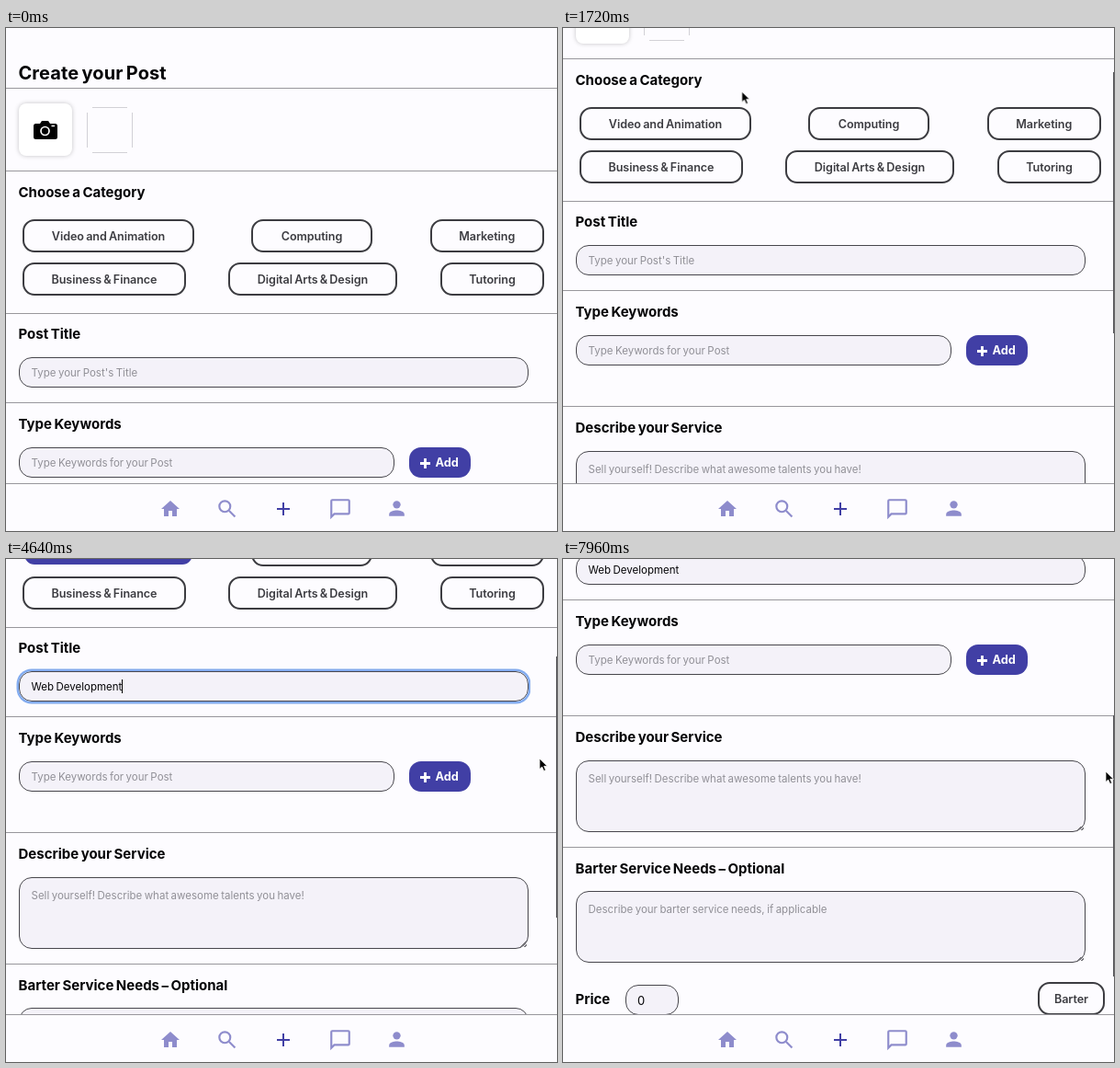
These frames come from a looping animation (600x547 px, 8 s). An HTML page:

```html
<!DOCTYPE html>
<html lang="en">
<head>
<meta charset="utf-8">
<title>Create your Post</title>
<style>
  * { box-sizing: border-box; }
  html, body { margin: 0; width: 100%; height: 100%; overflow: hidden; background: #fdfcff; }
  body { position: relative; font-family: Inter, "Open Sans", sans-serif; word-spacing: -.07em; color: #050507; }
  :root { --loop: 8s linear infinite; --ink: #3c3c41; --purple: #413fa5; }

  #view { position: absolute; left: 0; top: 0; width: 600px; height: 495px; overflow: hidden; }
  #page, #lower { position: absolute; left: 0; top: 0; width: 600px; height: 0; }
  #page > *, #lower > *, nav svg { position: absolute; }
  #page { animation: scroll var(--loop); }
  #lower { animation: push var(--loop); }

  h1, h2 { margin: 0; left: 13.5px; line-height: 20px; font-weight: 700; white-space: nowrap; word-spacing: -.07em; }
  h1 { font-size: 20px; letter-spacing: .07px; }
  h2 { font-size: 15px; letter-spacing: 0; }
  hr { margin: 0; border: 0; left: 0; width: 600px; height: 1px; background: #98979c; }

  .card { left: 14px; top: 82px; width: 58px; height: 57px; border-radius: 8px; background: #fff; box-shadow: 0 0 5px rgba(0, 0, 0, .23); }
  .pill { height: 36px; border: 2px solid var(--ink); border-radius: 13px; font-size: 12.6px; font-weight: 600;
    letter-spacing: -.07px; word-spacing: -.07em; line-height: 33px; text-align: center; color: var(--ink); white-space: nowrap; }
  .fill { position: absolute; inset: 0; border-radius: 11px; background: var(--purple); color: #fff; line-height: 33px; }
  #video { animation: unborder var(--loop); }
  #video .fill { opacity: 0; animation: pick var(--loop); }

  .field { left: 14px; height: 33px; padding-left: 12.5px; border: 1px solid #47464c; border-radius: 14px; background: #f4f2f9;
    font-size: 11.5px; letter-spacing: .01px; word-spacing: -.07em; line-height: 32px; white-space: nowrap; }
  .area { width: 554.5px; height: 78px; line-height: 38px; }
  .area::after { content: ""; position: absolute; right: 1px; bottom: 1px; width: 7px; height: 7px;
    background: linear-gradient(135deg, transparent 50%, #77767c 50% 60%, transparent 60% 76%, #77767c 76% 86%, transparent 86%); }
  .ph { color: #919097; }
  .ring { position: absolute; inset: -1px; border-radius: 14px; box-shadow: 0 0 0 2.5px #82abef; opacity: 0; }
  .caret { display: inline-block; width: 1px; height: 15px; margin-right: -1px; vertical-align: -3px; background: #000; opacity: 0; }
  #title .ring, #title .caret { animation: focus1 var(--loop); }
  #words .ring, #words .caret { animation: focus2 var(--loop); }

  .add { left: 438.5px; top: 456px; width: 67px; height: 33px; border-radius: 13px; background: var(--purple); color: #fff;
    font-size: 12.8px; font-weight: 700; letter-spacing: -.1px; line-height: 34px; padding-left: 29px; }
  .add svg { position: absolute; left: 12px; top: 12px; }
  .chip { left: 270px; top: 513px; width: 64px; height: 25px; border: 1px solid #4a494f; border-radius: 13px;
    padding-left: 8px; font-size: 12.6px; line-height: 23px; color: #45444a; opacity: 0; animation: chip var(--loop); }
  .chip svg { position: absolute; left: 44px; top: 7px; }

  #bar { position: absolute; left: 599px; top: 0; width: 1px; height: 284px; background: #56555a; animation: bar var(--loop), barfade var(--loop); }
  nav { position: absolute; left: 0; top: 495px; width: 600px; height: 52px; border-top: 1px solid #98979c; background: #fdfcff; fill: #8e8ccc; }
  #cursor { position: absolute; left: 0; top: 0; animation: move var(--loop), hide var(--loop); }
  #cursor svg { position: absolute; overflow: visible; }
  #arrow { left: -1px; top: -1px; animation: arrow var(--loop); }
  #beam { left: -4px; top: -7px; opacity: 0; animation: beam var(--loop); }

  /* cubic ease-out gives the flick of a trackpad scroll */
  @keyframes scroll {
    0%, 10.4% { transform: translateY(0); animation-timing-function: cubic-bezier(.215, .61, .355, 1); }
    20.5%, 25.7% { transform: translateY(-122px); animation-timing-function: cubic-bezier(.215, .61, .355, 1); }
    30.5%, 46.5% { transform: translateY(-160px); animation-timing-function: cubic-bezier(.215, .61, .355, 1); }
    58% { transform: translateY(-236px); }
    62%, 94.4% { transform: translateY(-239px); animation-timing-function: cubic-bezier(.215, .61, .355, 1); }
    99.5%, 100% { transform: translateY(-363px); }
  }
  @keyframes bar {
    0%, 10.4% { transform: translateY(-14px); animation-timing-function: cubic-bezier(.215, .61, .355, 1); }
    20.5%, 25.7% { transform: translateY(48px); animation-timing-function: cubic-bezier(.215, .61, .355, 1); }
    30.5%, 46.5% { transform: translateY(67px); animation-timing-function: cubic-bezier(.215, .61, .355, 1); }
    58% { transform: translateY(106px); }
    62%, 78.9% { transform: translateY(107px); height: 284px; }
    79%, 91.4% { transform: translateY(103px); height: 275px; }
    91.5%, 94.4% { transform: translateY(107px); height: 284px; animation-timing-function: cubic-bezier(.215, .61, .355, 1); }
    99.5%, 100% { transform: translateY(170px); }
  }
  @keyframes barfade {
    0%, 10.4% { opacity: 0; }
    10.5%, 34% { opacity: 1; }
    37%, 46.4% { opacity: 0; }
    46.5%, 62% { opacity: 1; }
    65%, 79.9% { opacity: 0; }
    80%, 85.5% { opacity: 1; }
    88%, 94.4% { opacity: 0; }
    94.5%, 100% { opacity: 1; }
  }
  @keyframes push {
    0%, 78.99% { transform: none; }
    79%, 91.49% { transform: translateY(35px); }
    91.5%, 100% { transform: none; }
  }
  @keyframes chip { 0%, 78.99% { opacity: 0; } 79%, 91.49% { opacity: 1; } 91.5%, 100% { opacity: 0; } }
  @keyframes pick { 0%, 24.99% { opacity: 0; } 25%, 100% { opacity: 1; } }
  @keyframes unborder { 0%, 24.99% { border-color: var(--ink); } 25%, 100% { border-color: transparent; } }
  @keyframes focus1 { 0%, 31.49% { opacity: 0; } 31.5%, 63.49% { opacity: 1; } 63.5%, 100% { opacity: 0; } }
  @keyframes focus2 { 0%, 63.49% { opacity: 0; } 63.5%, 78.99% { opacity: 1; } 79%, 100% { opacity: 0; } }
  @keyframes move {
    0%, 6.4% { transform: translate(556px, -16px); animation-timing-function: ease-out; }
    8.5%, 14% { transform: translate(584px, 36px); animation-timing-function: ease-in-out; }
    20.5%, 21.5% { transform: translate(195px, 69px); }
    24%, 26% { transform: translate(140px, 102px); animation-timing-function: ease-in-out; }
    31%, 43.5% { transform: translate(528px, 209px); }
    44.5%, 46.5% { transform: translate(560px, 214px); }
    48.5%, 59% { transform: translate(581px, 217px); animation-timing-function: ease-in-out; }
    63%, 72% { transform: translate(400px, 234px); animation-timing-function: ease-in-out; }
    74.5% { transform: translate(556px, 346px); animation-timing-function: ease-in-out; }
    78%, 79.5% { transform: translate(474px, 236px); animation-timing-function: ease-out; }
    82%, 89% { transform: translate(575px, 241px); animation-timing-function: ease-in-out; }
    91%, 94.5% { transform: translate(320px, 286px); animation-timing-function: ease-out; }
    97%, 100% { transform: translate(591px, 231px); }
  }
  @keyframes hide {
    0%, 33.99% { opacity: 1; }
    34%, 43.49% { opacity: 0; }
    43.5%, 67.99% { opacity: 1; }
    68%, 71.99% { opacity: 0; }
    72%, 100% { opacity: 1; }
  }
  @keyframes beam {
    0%, 30.49% { opacity: 0; }
    30.5%, 46.49% { opacity: 1; }
    46.5%, 61.99% { opacity: 0; }
    62%, 72.49% { opacity: 1; }
    72.5%, 100% { opacity: 0; }
  }
  @keyframes arrow {
    0%, 30.49% { opacity: 1; }
    30.5%, 46.49% { opacity: 0; }
    46.5%, 61.99% { opacity: 1; }
    62%, 72.49% { opacity: 0; }
    72.5%, 100% { opacity: 1; }
  }
</style>
</head>
<body>
<div id="view">
  <div id="page">
    <h1 style="top:39px">Create your Post</h1>
    <hr style="top:65px">
    <div class="card"></div>
    <svg style="left:29px;top:100px" width="28" height="22" viewBox="0 0 28 22">
      <path d="M8 4l2-3h7l2 3h5.500q2.500 0 2.500 2.500v12q0 2.500-2.500 2.500h-21q-2.500 0-2.500-2.500v-12q0-2.500 2.500-2.500z"/>
      <circle cx="13.500" cy="12" r="4.500" fill="none" stroke="#fff" stroke-width="1.700"/>
      <path d="M20.500 6.500h3.500" stroke="#fff" stroke-width="1.500"/>
    </svg>
    <svg style="left:88px;top:86px" width="50" height="50" fill="none" stroke="#d2d1d6">
      <path d="M6 .5h38M6 49.500h38M.5 6v38M49.500 6v38"/>
    </svg>
    <hr style="top:155px">

    <h2 style="top:169px">Choose a Category</h2>
    <div class="pill" id="video" style="left:18px;top:208px;width:187px">Video and Animation<div class="fill">Video and Animation</div></div>
    <div class="pill" style="left:267px;top:208px;width:132px">Computing</div>
    <div class="pill" style="left:461.500px;top:208px;width:124.500px">Marketing</div>
    <div class="pill" style="left:18px;top:255px;width:178px">Business &amp; Finance</div>
    <div class="pill" style="left:242px;top:255px;width:184px">Digital Arts &amp; Design</div>
    <div class="pill" style="left:473px;top:255px;width:113px">Tutoring</div>
    <hr style="top:310px">

    <h2 style="top:323px">Post Title</h2>
    <div class="field" id="title" style="top:358px;width:554.500px"><div class="ring"></div><span class="val"></span><i class="caret"></i><span class="ph">Type your Post's Title</span></div>
    <hr style="top:407px">

    <h2 style="top:420.500px">Type Keywords</h2>
    <div class="field" id="words" style="top:456px;width:408.500px"><div class="ring"></div><span class="val"></span><i class="caret"></i><span class="ph">Type Keywords for your Post</span></div>
    <div class="add">Add<svg width="11" height="11"><path d="M5.500 0v11M0 5.500h11" stroke="#fff" stroke-width="2.800"/></svg></div>
    <div class="chip">ui/ux<svg width="10" height="10"><path d="M1.200 1.200l7.600 7.600M8.800 1.200l-7.600 7.600" stroke="#3a393f" stroke-width="3"/></svg></div>

    <div id="lower">
      <hr style="top:533px">
      <h2 style="top:547px">Describe your Service</h2>
      <div class="field area" style="top:582px"><span class="ph">Sell yourself! Describe what awesome talents you have!</span></div>
      <hr style="top:676px">
      <h2 style="top:690px">Barter Service Needs – Optional</h2>
      <div class="field area" style="top:724px"><span class="ph">Describe your barter service needs, if applicable</span></div>
      <h2 style="top:832px">Price</h2>
      <div class="field" style="left:67.500px;top:826px;width:58px;font-size:13px;line-height:33px">0</div>
      <div class="pill" style="left:517px;top:823px;width:73px">Barter</div>
    </div>
  </div>
  <div id="bar"></div>
</div>

<nav>
  <svg style="left:167px;top:15px" width="24" height="24" viewBox="0 0 24 24"><path d="M10 20v-6h4v6h5v-8h3L12 3 2 12h3v8z"/></svg>
  <svg style="left:228px;top:14px" width="26" height="26" viewBox="0 0 24 24" fill="none" stroke="#8e8ccc" stroke-width="2"><circle cx="9.500" cy="9.500" r="5.500"/><path d="M13.800 13.800l6 6"/></svg>
  <svg style="left:290px;top:15px" width="24" height="24" viewBox="0 0 24 24" stroke="#413fa5" stroke-width="2"><path d="M12 5v14M5 12h14"/></svg>
  <svg style="left:351px;top:14px" width="26" height="26" viewBox="0 0 24 24" fill="none" stroke="#8e8ccc" stroke-width="2"><path d="M3 20V4q0-1 1-1h16q1 0 1 1v12q0 1-1 1H6z"/></svg>
  <svg style="left:413px;top:14px" width="25" height="25" viewBox="0 0 24 24"><circle cx="12" cy="8" r="4"/><path d="M12 14c-2.700 0-8 1.300-8 4v2h16v-2c0-2.700-5.300-4-8-4z"/></svg>
</nav>

<div id="cursor">
  <svg id="arrow" width="12" height="17"><path d="M1 1v11.500l2.700-2.400 2 4.400 2-.9-1.900-4.300h3.700z" stroke="#fff" stroke-width=".8"/></svg>
  <svg id="beam" width="8" height="14" fill="none" stroke="#222"><path d="M1 .8q3 0 3 2v8.400q0 2-3 2M7 .8q-3 0-3 2v8.400q0 2 3 2M2.500 7.500h3"/></svg>
</div>

<script>
  const LOOP = 8000;

  // Number of letters out after typing n of them evenly between a and b.
  const letters = (t, a, b, n) => Math.max(0, Math.min(n, Math.ceil((t - a) / (b - a) * n)));

  function show(id, text) {
    const box = document.getElementById(id);
    const val = box.querySelector('.val');
    if (val.textContent === text) return;
    val.textContent = text;
    box.querySelector('.ph').style.display = text ? 'none' : '';
  }

  let start;
  function tick() {
    const now = performance.now();
    start ??= now;
    const t = (now - start) % LOOP;
    const n = letters(t, 2720, 3320, 6) + letters(t, 3380, 3560, 9);
    show('title', 'Web Development'.slice(0, n));
    show('words', t < 6320 ? 'ui/ux'.slice(0, letters(t, 5440, 5920, 5)) : '');
    requestAnimationFrame(tick);
  }
  requestAnimationFrame(tick);
</script>
</body>
</html>
```
